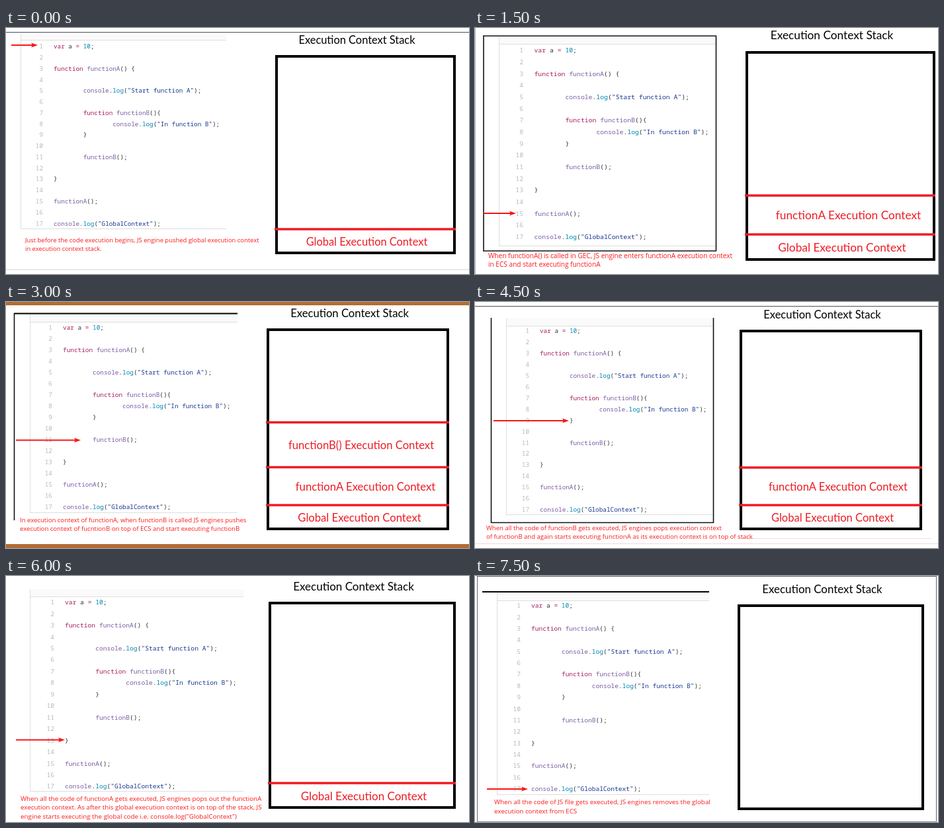
An HTML page for the animation above (9000 ms loop, 700 by 373 pixels).

```html
<!DOCTYPE html>
<html lang="en">
<head>
<meta charset="utf-8">
<title>Execution Context Stack</title>
<style>
  html, body { margin: 0; width: 100%; height: 100%; overflow: hidden; background: #fff; }
  svg { display: block; width: 700px; height: 373px; }
  text { white-space: pre; }
  .code { font-family: "Noto Sans Mono", "DejaVu Sans Mono", monospace; fill: #333; }
  .number { fill: #b9b9b9; text-anchor: end; }
  .keyword { fill: #a71d5d; }
  .name { fill: #795da3; }
  .builtin { fill: #0086b3; }
  .string { fill: #183691; }
  .label { font-family: Lato, sans-serif; text-anchor: middle; fill: #000; }
  .context { fill: #ed1c24; }
  .caption { font-family: "Open Sans", sans-serif; fill: #fb1a1a; }
</style>
</head>
<body>
<svg id="stage" viewBox="0 0 700 373"></svg>
<script>
const STEP = 1500;
const RED = '#ed1c24', ARROW = '#fb1414', PALE = '#dedede';
const SOURCE = `var a = 10;

function functionA() {

\tconsole.log("Start function A");

\tfunction functionB(){
\t\tconsole.log("In function B");
\t}

\tfunctionB();

}

functionA();

console.log("GlobalContext");`.split('\n');

const TOKENS = [
  ['string', /^"[^"]*"/],
  ['keyword', /^(var|function)\b|^=/],
  ['name', /^(function[AB]|console)\b/],
  ['builtin', /^(log|\d+)\b/],
  ['', /^(\w+|\s+|.)/]
];

// code: x, first baseline, row height, character width, right edge of numbers
// box: pale listing box (left, top, header line, right, bottom)
// stack: outer edges; contexts: [text, centre x, baseline, divider y]
// rules: [x1, y1, x2, y2, colour, width]
const G = 'Global Execution Context', A = 'functionA Execution Context';
const B = 'functionB() Execution Context';
const scenes = [
  {
    code: [72, 31.2, 16.77, 5.58, 56], box: [22, 10, 18.5, 333, 305],
    stack: [407, 41, 680, 343], size: 16.4, title: [530.5, 24],
    contexts: [[G, 545.5, 330, 305]], arrow: [8, 26, 48],
    rules: [[0, 6.5, 700, 6.5, '#4a4f5c', 1], [0, 366.5, 700, 366.5, '#d8d8d8', 1]],
    caption: [29, 324.5, 9.43, 13,
      'Just before the code execution begins, JS engine pushed global execution context',
      'in execution context stack.']
  },
  {
    code: [89.5, 37.2, 17.68, 5.87, 73], box: [36, 13, 24.5, 364, 331],
    stack: [409, 35, 696, 353], size: 17.3, title: [539.5, 17],
    contexts: [[A, 564.5, 290, 254], [G, 555, 339, 313]], arrow: [13, 281, 62],
    rules: [[0.5, 0, 0.5, 373, '#a9bfdc', 1], [12, 12, 365, 12, '#111', 1.6],
      [12, 338, 365, 338, '#111', 1.6], [13, 12, 13, 338, '#111', 1.6],
      [364.5, 12, 364.5, 338, '#111', 1.6]],
    caption: [20, 348.5, 10.1, 13.5,
      'When functionA() is called in GEC, JS engine enters functionA execution context',
      'in ECS and start executing functionA']
  },
  {
    code: [86, 42, 17, 5.63, 70], box: [36, 18, 30.5, 350, 320],
    stack: [394, 40, 670, 346], size: 16.65, title: [519.5, 23],
    contexts: [[B, 537, 223, 182.5], [A, 543.5, 286, 250.5], [G, 534.5, 333, 308]],
    arrow: [15, 209.5, 113],
    rules: [[0, 2.5, 700, 2.5, '#b26c34', 5], [0, 370, 700, 370, '#b26c34', 6],
      [12, 17.5, 350, 17.5, '#000', 2], [12.5, 17, 12.5, 331, '#111', 1.6]],
    caption: [21, 333.5, 9.58, 13.5,
      'In execution context of functionA, when functionB is called JS engines pushes',
      'execution context of fucntionB on top of ECS and start executing functionB']
  },
  {
    code: [98, 47.2, 16.93, 5.61, 82], box: [47, 25, 36.5, 360, 323],
    stack: [400, 42, 676, 346], size: 16.55, title: [525, 25],
    contexts: [[A, 549, 286, 251], [G, 540.5, 333, 308]], arrow: [28, 180, 142],
    rules: [[0, 6.5, 700, 6.5, '#5b4b50', 1], [0, 366.5, 700, 366.5, '#f0d9de', 1],
      [400, 358.5, 690, 358.5, '#e4e4e4', 1], [24.5, 24, 24.5, 335, '#111', 1.6],
      [360.5, 24, 360.5, 335, '#111', 1.6], [24, 334.5, 361, 334.5, '#111', 1.6]],
    caption: [17, 345.5, 9.55, 13,
      'When all the code of functionB gets executed, JS engines pops execution context',
      'of functionB and again starts executing functionA as its execution context is on top of stack']
  },
  {
    code: [89, 43.2, 17.45, 5.77, 73], box: [36, 20, 31.5, 359, 327],
    stack: [397, 39, 680, 353], size: 17, title: [525.5, 22],
    contexts: [[G, 541, 340, 314]], arrow: [15, 248.5, 89],
    rules: [],
    caption: [22, 341, 9.82, 13.3,
      'When all the code of functionA gets executed, JS engines pops out the functionA',
      'execution context. As after this global execution context is on top of the stack, JS',
      'engine starts executing the global code i.e. console.log("GlobalContext")']
  },
  {
    code: [85, 48.2, 17.37, 5.74, 69], box: [33, 25, 37.5, 354, 332],
    stack: [397, 43, 679, 355], size: 16.9, title: [525, 26],
    contexts: [], arrow: [18, 323, 80],
    rules: [[3, 0.5, 698, 0.5, '#5c6270', 1], [3.5, 0, 3.5, 373, '#5c6270', 1],
      [697.5, 0, 697.5, 373, '#5c6270', 1], [3, 372.5, 698, 372.5, '#8a8f9a', 1],
      [11, 24, 354, 24, '#000', 2]],
    caption: [29, 346, 9.82, 13.5,
      'When all the code of JS file gets executed, JS engines removes the global',
      'execution context from ECS']
  }
];

function add(parent, tag, attrs, content = '') {
  const node = document.createElementNS('http://www.w3.org/2000/svg', tag);
  for (const key in attrs) node.setAttribute(key, attrs[key]);
  node.textContent = content;
  return parent.appendChild(node);
}

function line(parent, x1, y1, x2, y2, stroke, width) {
  add(parent, 'line', { x1, y1, x2, y2, stroke, 'stroke-width': width });
}

function text(parent, cls, x, y, size, content) {
  return add(parent, 'text', { class: cls, x, y, 'font-size': size }, content);
}

function drawListing(parent, [x, y, row, pitch, numberX], [left, top, header, right, bottom]) {
  add(parent, 'rect', { x: left, y: top, width: right - left, height: header - top, fill: '#fafafa' });
  line(parent, left, header, right, header, PALE, 1);
  line(parent, left + 0.5, top, left + 0.5, bottom, PALE, 1);
  line(parent, left, bottom - 0.5, right, bottom - 0.5, PALE, 1);

  const size = pitch / 0.6;
  SOURCE.forEach((raw, i) => {
    const baseline = y + i * row;
    text(parent, 'code number', numberX, baseline, size, i + 1);
    let rest = raw.trimStart();
    const indent = (raw.length - rest.length) * 8 * pitch;
    const node = text(parent, 'code', x + indent, baseline, size);
    while (rest) {
      const [cls, pattern] = TOKENS.find(([, p]) => p.test(rest));
      const [token] = rest.match(pattern);
      add(node, 'tspan', { class: cls }, token);
      rest = rest.slice(token.length);
    }
  });
}

function drawStack(parent, { stack: [left, top, right, bottom], contexts, title, size }) {
  add(parent, 'rect', {
    x: left + 2, y: top + 2, width: right - left - 4, height: bottom - top - 4,
    fill: 'none', stroke: '#000', 'stroke-width': 4
  });
  text(parent, 'label', ...title, size, 'Execution Context Stack');
  for (const [name, x, baseline, divider] of contexts) {
    line(parent, left - 1, divider, right, divider, RED, 3.4);
    text(parent, 'label context', x, baseline, size, name);
  }
}

function drawArrow(parent, [x, y, tip]) {
  line(parent, x, y, tip - 6, y, ARROW, 2);
  add(parent, 'path', { d: `M${tip} ${y}l-10 -3.5l2 3.5l-2 3.5z`, fill: ARROW });
}

function drawScene(parent, scene) {
  add(parent, 'rect', { width: 700, height: 373, fill: '#fff' });
  drawListing(parent, scene.code, scene.box);
  scene.rules.forEach(rule => line(parent, ...rule));
  drawStack(parent, scene);
  drawArrow(parent, scene.arrow);
  const [x, y, size, leading, ...lines] = scene.caption;
  lines.forEach((content, i) => text(parent, 'caption', x, y + i * leading, size, content));
}

const stage = document.getElementById('stage');
const count = scenes.length;
scenes.forEach((scene, i) => {
  const group = add(stage, 'g', {});
  drawScene(group, scene);
  group.animate([
    { opacity: 1, offset: 0 }, { opacity: 1, offset: 1 / count },
    { opacity: 0, offset: 1 / count }, { opacity: 0, offset: 1 }
  ], { duration: STEP * count, iterations: Infinity, iterationStart: (count - i) % count / count });
});
</script>
</body>
</html>
```
